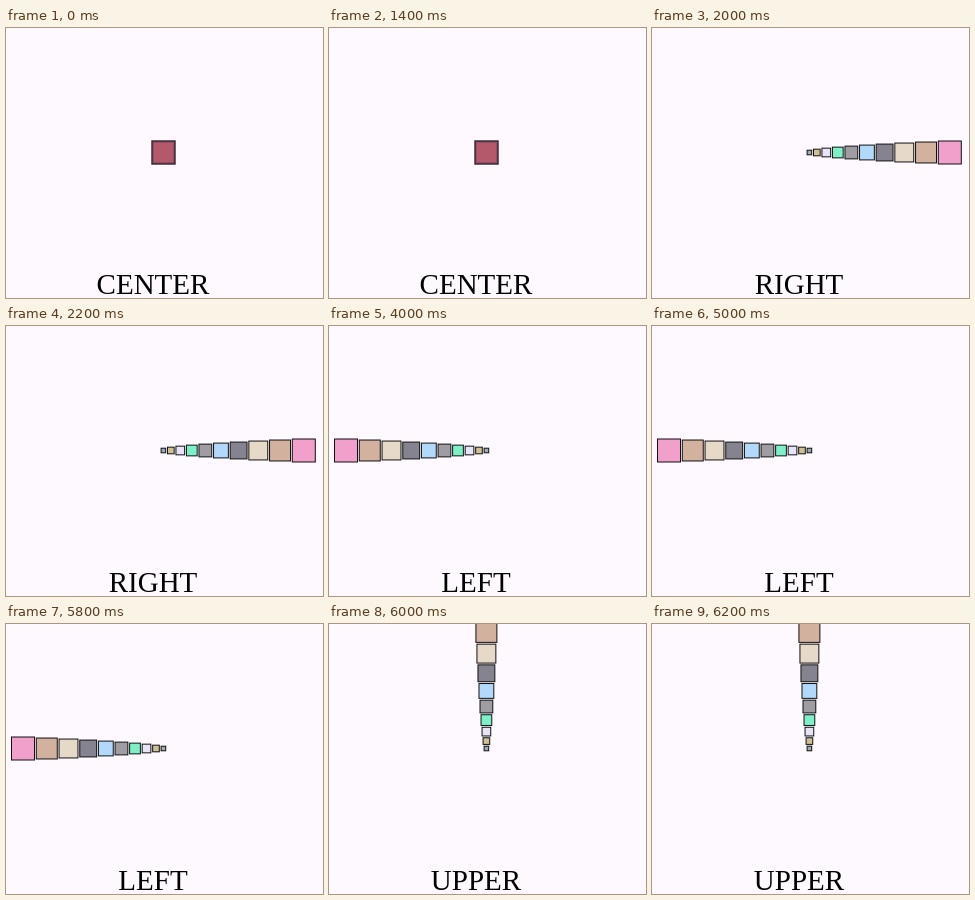
These frames come from a looping animation (317x270 px, 8000 ms). An HTML page:

```html
<!DOCTYPE html>
<html lang="en">
<head>
<meta charset="utf-8">
<title>Directions</title>
<style>
  html, body { margin: 0; width: 100%; height: 100%; overflow: hidden; background: #fef9ff; }
  svg { display: block; }
  text { font: 29px "Liberation Serif", "Times New Roman", serif; text-anchor: middle; }
</style>
</head>
<body>
<svg width="317" height="270" viewBox="0 0 317 270">
  <g id="row" stroke="#111"></g>
  <g id="stack">
    <rect x="146" y="113" width="23" height="23" fill="#b4586c" stroke="#292431" stroke-width="1.4"/>
    <rect x="147.5" y="114.5" width="20" height="20" fill="none" stroke="#9b4b60"/>
  </g>
  <text id="label" x="147" y="266"></text>
</svg>
<script>
const LOOP = 8000;
const STEP = 2000;
const CENTER = { x: 157.4, y: 124.5 };
const GAP = 1.8;
const COLORS = ["#9aaab6", "#cfc093", "#e6e4f6", "#7df0c8", "#9f9ca3",
                "#b2d8fa", "#85838f", "#e6d9c7", "#d2b19f", "#f0a0cb"];
const SCENES = [
  { name: "CENTER", dx: 0, dy: 0 },
  { name: "RIGHT", dx: 1, dy: 0 },
  { name: "LEFT", dx: -1, dy: 0 },
  { name: "UPPER", dx: 0, dy: -1 }
];

const byId = id => document.getElementById(id);
const row = byId("row"), stack = byId("stack"), label = byId("label");

// Squares grow evenly outwards, with a constant gap between them.
let edge = 0;
const squares = COLORS.map((fill, i) => {
  const size = 23 * (0.2 + 0.8 * i / (COLORS.length - 1));
  const distance = i ? edge + GAP + size / 2 : 0;
  edge = distance + size / 2;
  const node = document.createElementNS("http://www.w3.org/2000/svg", "rect");
  node.setAttribute("fill", fill);
  node.setAttribute("width", size);
  node.setAttribute("height", size);
  row.append(node);
  return { node, size, distance };
});

function render(time) {
  const { name, dx, dy } = SCENES[Math.floor((time % LOOP) / STEP)];
  const spread = dx !== 0 || dy !== 0;
  label.textContent = name;
  row.style.display = spread ? "" : "none";
  stack.style.display = spread ? "none" : "";
  for (const { node, size, distance } of squares) {
    node.setAttribute("x", CENTER.x + dx * distance - size / 2);
    node.setAttribute("y", CENTER.y + dy * distance - size / 2);
  }
}

const start = performance.now();
function tick() {
  render(performance.now() - start);
  requestAnimationFrame(tick);
}
tick();
</script>
</body>
</html>
```
